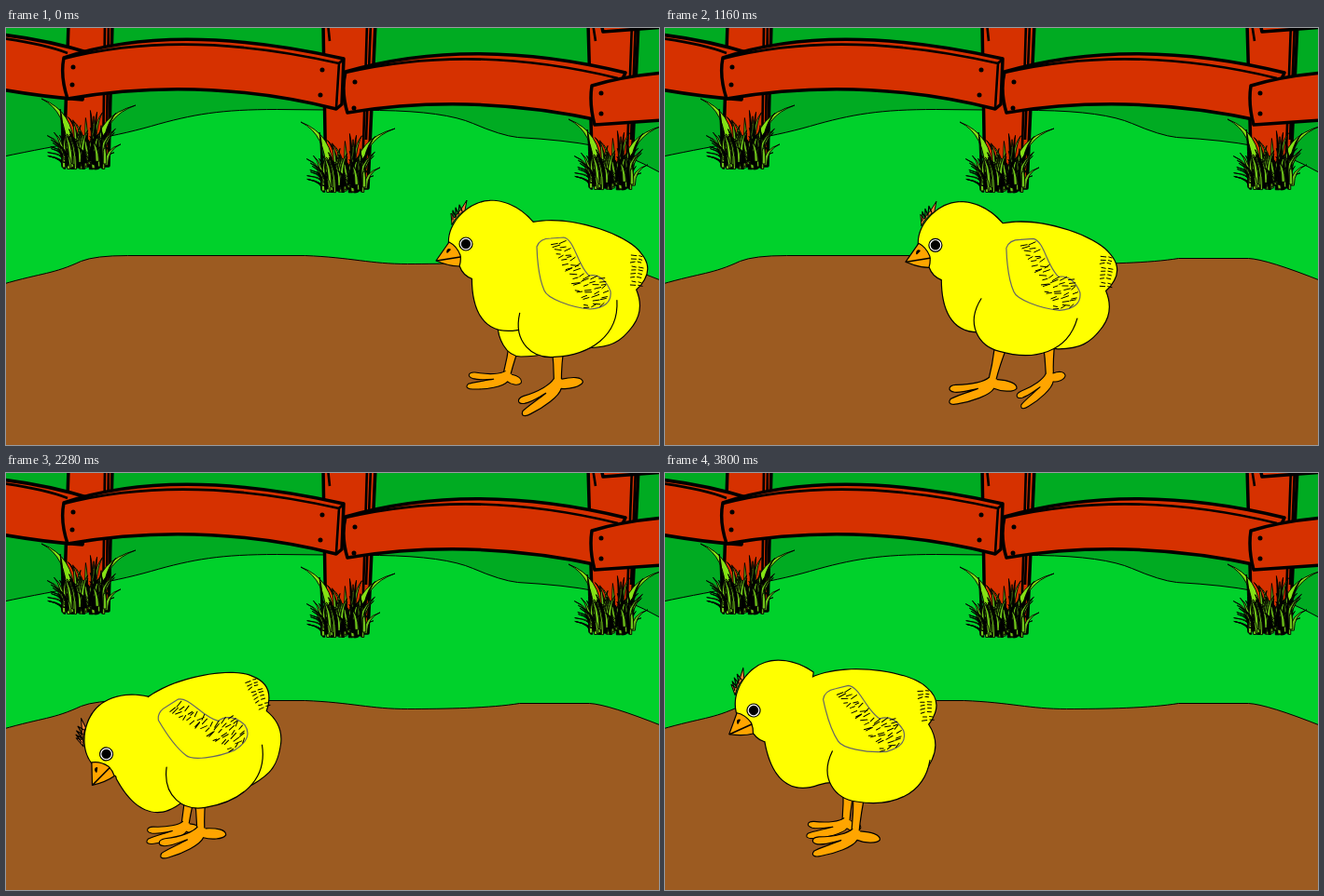
An HTML page for the animation above (3840 ms loop, 700 by 448 pixels).

```html
<!DOCTYPE html>
<html lang="en">
<head>
<meta charset="utf-8">
<title>Chick</title>
<style>
  html, body { margin: 0; width: 100%; height: 100%; overflow: hidden; }
  svg { display: block; width: 700px; height: 448px; background: #00ab22; }
  .fence { fill: #d63100; stroke: #000; stroke-width: 3.5; stroke-linejoin: round; }
  .thin { fill: none; stroke-width: 2.6; }
  .nails { stroke-width: 5; stroke-linecap: round; }
  .chick { fill: #ff0; stroke: #000; stroke-width: 1.2; stroke-linecap: round; stroke-linejoin: round; }
  .outline { stroke-width: 2.4; }
  .orange { fill: #ffa500; }
  .line { fill: none; }
</style>
</head>
<body>
<svg viewBox="0 0 700 448">
  <defs><g id="tuft" stroke="#000" stroke-width=".9"></g></defs>
  <g stroke="#000" transform="translate(.5 .5)">
    <path fill="#00d12b" d="M-5 138C60 124 110 118 155 105S230 87 290 87L400 88Q470 89 500 102T548 117Q600 120 630 126T705 157V455H-5Z"/>
    <path fill="#9c5b21" d="M-5 275C40 262 50 264 80 250Q95 244 130 244H320C370 246 390 253 430 253S520 252 550 247H625Q645 248 705 272V455H-5Z"/>
  </g>
  <g class="fence">
    <path d="M67-5L62 148H110L114-5ZM340-5L343 172H388L396-5ZM624-5L629 168H670L678-5Z"/>
    <path class="thin" d="M106-5L104 140M110-5L108 110M345-5L347 14M387-5L382 160M391-5L386 120M629-5L632 14M671-5L665 160M675-5L670 120"/>
    <path d="M638-5L640 4L705-1V-5Z"/>
    <path d="M-5 7Q45 13 90 27L82 77Q40 74-5 66Z"/>
    <path class="thin" d="M-5 11Q40 17 66 27"/>
    <path d="M364 47Q500 8 664 48L640 100Q500 69 366 91Q359 68 364 47Z"/>
    <path class="thin" d="M364 48Q500 16 656 54"/>
    <path d="M62 32Q180-8 362 33L360 82L354 87Q210 51 66 76Q58 52 62 32Z"/>
    <path class="thin" d="M62 33Q190 0 357 38L354 86M357 38L362 33"/>
    <path d="M628 62Q660 52 705 48V99L631 104Q625 82 628 62Z"/>
    <path class="nails" d="M72 42h0M71 61h0M339 45h0M337 72h0M374 58h0M373 86h0M638 70h0M638 92h0"/>
  </g>
  <use href="#tuft" x="85" y="152"/>
  <use href="#tuft" x="363" y="177"/>
  <use href="#tuft" x="650" y="174"/>

  <g id="chick" class="chick">
    <g id="far" class="orange"><path/><path/></g>
    <path id="farThigh" d="M130 318C130 332 138 353 155 353Q170 353 182 350V318"/>
    <g class="outline">
      <path id="trunk" d="M-43-55C0-63 60-40 72-22Q84-8 76 6Q73 12 67 17Q76 38 64 55C50 74 40 78 17 79L-16 76L-36 62Q-48 58-60 60C-95 66-108 40-108 5L-95-40Z"/>
      <path id="skull" d="M72-23C55-43 35-47 25-46C5-45-18-25-18-2C-18 10-12 20-6 24Q-3 33 7 37L45 40Z"/>
    </g>
    <g stroke="none"><use href="#trunk"/><use href="#skull"/></g>
    <g id="near" class="orange"><path/><path/></g>
    <path id="thigh" d="M-52-13C-62 18-42 37-19 37C20 38 52 20 53-18"/>
    <g id="plumage" class="line">
      <path stroke="#666" fill="#ff0" d="M-39-29Q-36-38-24-38L-10-39C2-36 4-10 17 2C28 0 36 8 40 19Q42 36 18 38C-4 36-28 26-31 18Q-38 2-39-29Z"/>
      <path id="feathers" stroke-width="1"/>
    </g>
    <g id="head">
      <path fill="#f7823a" stroke-width="1" d="M-15-21L-16-33L-12-28L-9-33L-6-36L1-47L-1-36Q-10-31-15-21Z"/>
      <path class="line" d="M-14-26L-14-36L-11-29L-11-39L-8-32L-7-42L-4-35"/>
      <path class="orange" d="M-18-2L-32 18Q-18 24-7 24Q-5 18-6 12Q-10 2-18-2Z"/>
      <path class="line" stroke-width="1.6" d="M-31 18L-6 14M-20 9Q-20 5-17 6L-20 9"/>
      <circle r="7" fill="#fff"/><circle r="4.6" fill="#000"/>
    </g>
  </g>
</svg>
<script>
const $ = id => document.getElementById(id);
const draw = (el, d) => el.setAttribute('d', d);
const place = (el, [x, y, turn = 0], size = 1) =>
  el.setAttribute('transform', `translate(${x} ${y}) rotate(${turn}) scale(${size})`);

let seed = 7;
const rnd = (lo, hi) => {
  seed = seed * 16807 % 2147483647;
  return lo + (hi - lo) * seed / 2147483647;
};

// Grass: blades rise straight and bend towards the tip
const blade = (x, y, w, tx, ty, fill, bend = .75) => {
  const cy = y + (ty - y) * bend;
  return `<path fill="${fill}" d="M${x} ${y}Q${x} ${cy} ${tx} ${ty}Q${x + w} ${cy} ${x + w} ${y}Z"/>`;
};
let grass = blade(-20, -22, 8, -47, -76, '#84e214') + blade(12, -22, 8, 54, -69, '#84e214');
for (let i = 0; i < 110; i++) {
  const x = rnd(-25, 21), h = i < 10 ? rnd(40, 64) : rnd(10, 38), y = -rnd(0, 10);
  grass += blade(x, y, rnd(2, 4), x * 1.3 + rnd(-12, 12), y - h, i % 2 ? '#6fc41a' : '#000');
}
$('tuft').innerHTML = grass;

// Feather ticks follow the wing's right edge, then the tail
let ticks = '';
for (let y = -34; y < 36; y += 3.8) {
  const low = y > 4;
  const left = low ? -4 + (y - 4) * .5 : -27 + (y + 34) * .6;
  const right = low ? 38 - Math.abs(y - 18) * .3 : -6 + (y + 34) * .6;
  for (let x = left + rnd(0, 4); x < right - 4; x += rnd(8, 11))
    ticks += `M${x} ${y + rnd(0, 3)}l${Math.min(rnd(4, 8), right - x)} ${rnd(-4, 1)}`;
}
for (let y = -20; y < 15; y += 4)
  ticks += `M${rnd(61, 64)} ${y}l${rnd(4, 6)} ${rnd(-1, 1)}m3 0l${rnd(3, 5)} 1`;
draw($('feathers'), ticks);

draw($('near').children[1], foot(27));
draw($('far').children[1], foot(19));
function foot(back) {
  return `M-4-5C-8 0-20 6-38 9C-46 11-46 17-38 17C-28 16-22 12-14 9C-26 16-38 22-41 25C-44 31-38 31-33 29C-18 24 0 14 3 6C${back * .4} 8 ${back * .9} 7 ${back} 2C${back}-4 ${back * .6}-5 5-4`;
}

// Poses: parts are [x, y, turn]; legs are [hip x, ankle x, ankle y, foot turn]
const rest = { head: [95, 255, -15], trunk: [213, 265, -10], thigh: [229, 319, 8],
  near: [208, 204, 388, 9], far: [197, 194, 376, 16] };
const peck = { head: [121, 352, -59], trunk: [210, 281, -48], thigh: [222, 320, -30],
  near: [207, 214, 383, -4], far: [200, 190, 383, 8] };

const STEP = 13;
const ramp = (n, from, to) => {
  const t = Math.max(0, Math.min(1, (n - from) / (to - from)));
  return t * t * (3 - 2 * t);
};
// Leg swing from -1 (set down ahead) to 1 (pushed off behind) and back
function gait(n, stance, power) {
  const u = n % STEP;
  return u < stance ? 2 * (u / stance) ** power - 1 : 1 - 2 * ramp(u, stance, STEP);
}
function walk(n) {
  const s = gait(n + 6, 10, 1), f = gait(n, 7, 2);
  return { head: [96, 232, 0], trunk: [211, 264, 0], thigh: [203 + 18 * s, 315, -24 * s],
    near: [187 + 36 * s, 185 + 47 * s, 382 - 7 * s * s, -3 - 21 * s],
    far: [195 + 46 * f, 193 + 53 * f, 374, -2 - 22 * f] };
}
const mix = (a, b, t) => Object.fromEntries(
  Object.keys(a).map(k => [k, a[k].map((v, i) => v + (b[k][i] - v) * t)]));

function drawLeg(id, [hip, x, y, turn], top, size) {
  const [shin, toes] = $(id).children, mx = (hip + x) / 2, my = (top + y) / 2;
  draw(shin, `M${hip - 6} ${top}Q${mx - 4} ${my} ${x - 4} ${y - 2}H${x + 4}Q${mx + 4} ${my} ${hip + 7} ${top}`);
  place(toes, [x, y, turn], size);
}

function render(now) {
  // 72 drawings per loop, held on a 40 ms grid as 40, 80, 40
  const slot = Math.floor(now % 3840 / 40);
  const n = 3 * (slot >> 2) + [0, 1, 1, 2][slot & 3];

  const bob = 1.08 + .08 * Math.cos((n - 49) / 6 * 2 * Math.PI);
  const dip = ramp(n, 39, 48) * (1 - ramp(n, 55, 63)) * bob;
  const pose = mix(mix(walk(n), rest, ramp(n, 36, 42)), peck, dip);
  const kick = n > 63 ? Math.sin((n - 63) / 8 * Math.PI) : 0;
  pose.far = pose.far.map((v, i) => v + [65, 75, -6, -41][i] * kick);

  place($('chick'), [Math.max(0, 397 * (1 - n / 43)), n < 37 ? n * .06 : 0]);
  for (const [id, part] of [['trunk', 'trunk'], ['plumage', 'trunk'], ['skull', 'head'], ['head', 'head'], ['thigh', 'thigh']])
    place($(id), pose[part]);
  const back = pose.far[0] - 149;
  place($('farThigh'), [back, -.3 * back]);
  drawLeg('near', pose.near, 342, 1);
  drawLeg('far', pose.far, 335, .88);
}

const begin = performance.now();
function tick() {
  render(performance.now() - begin);
  requestAnimationFrame(tick);
}
tick();
</script>
</body>
</html>
```
